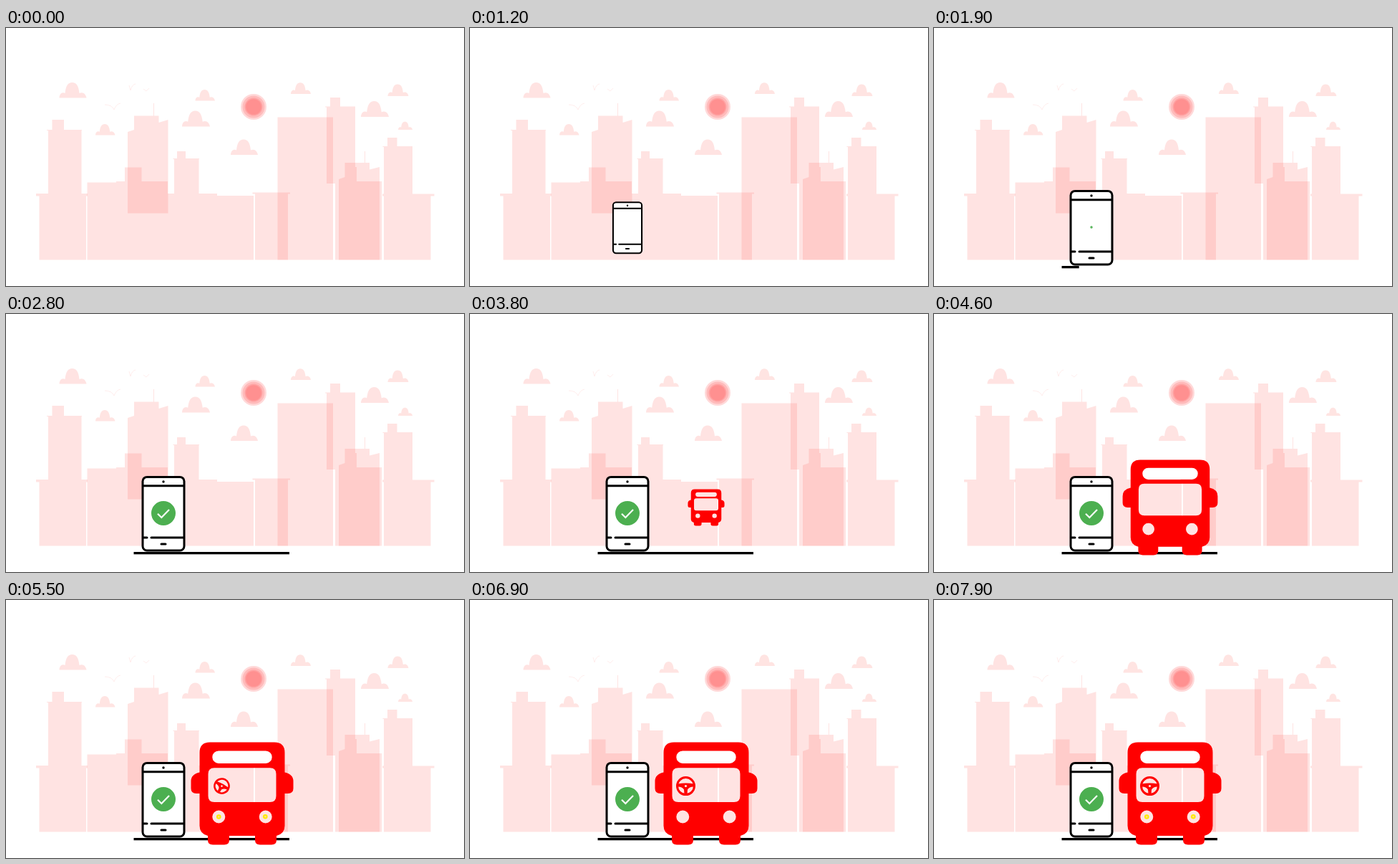
An HTML page that plays this animation: 640x360 px, repeating every 8 s.

```html
<!DOCTYPE html>
<html lang="en">
<head>
<meta charset="utf-8">
<title>Bus ticket</title>
<style>
  html, body { margin: 0; width: 100%; height: 100%; overflow: hidden; background: #fff; }
  svg { display: block; width: 100vw; height: 100vh; }
  .tint { fill: rgb(255, 80, 72); fill-opacity: .155; }
  .faint { fill: none; stroke: #ffe9e8; stroke-width: .8; }
  .ink { fill: none; stroke: #000; stroke-width: 3; stroke-linecap: round; }
</style>
</head>
<body>
<svg viewBox="0 0 640 360">
  <defs>
    <path id="cloud" d="M0 21.5C0 16 4 12.5 8 15C9 5 12 0 18 0S27 5 28 15C33 12.5 37 16 38 21.5Z"/>
  </defs>

  <g class="tint">
    <path d="M59 232V143H57V142H64.500V128H81V142H106V143H105.500V231H114V234.500H112V323.500H46.500V234.500H42V231H59Z"/>
    <path d="M113.500 323.500V215.500H154V214H166V194.500H189.500V214H226V323.500Z"/>
    <path d="M170 258.500V145L179 142V122.500H206V105H207V122.500H213.500V132L226.500 128V258.500Z"/>
    <path d="M226 323.500V231H235V183H233.500V182H239V172H251V182H270V183H269.500V231H295V234H346V323.500Z"/>
    <path d="M348 323.500V231.500H344.500V229.500H397V231.500H394V323.500Z"/>
    <path d="M379.500 124.500H457V323.500H379.500Z"/>
    <path d="M448 217V110.500H446V109.500H453V97H467V109.500H488V217Z"/>
    <path d="M460 323.500V217H488V194H490V214H525V323.500Z"/>
    <path d="M465 323.500V211L473.500 208V188H501V172H502V188H508V197.500L522 194V323.500Z"/>
    <path d="M528 323.500V234.500H526V231.500H528V166H526.500V165H533V153H546.500V165H568V231.500H598.500V234.500H593.500V323.500Z"/>
    <g id="clouds"></g>
  </g>
  <path class="faint" d="M172 80L174 87Q176 79 181 78M192 85L196 88L200 84M138 107Q148 107 151 114Q154 106 160 105"/>
  <g fill="#f44" fill-opacity=".2" transform="translate(346 110)">
    <circle r="18"/><circle r="15.500"/><circle r="12.500"/><circle r="10.800"/>
  </g>

  <rect id="ground" x="178.500" y="332" width="217.500" height="3.300"/>

  <g id="phone">
    <rect x="-29" y="-51.300" width="58" height="102.600" rx="6" fill="#fff" stroke="#000" stroke-width="3"/>
    <path class="ink" d="M-28-39H28M-28 33.300H-23M-17 33.300H28M-3 42.300H3"/>
    <circle cy="-44.700" r="1.700"/>
  </g>
  <g id="check">
    <circle r="17" fill="#4caf50"/>
    <path d="M-8 .8L-2.700 6L8-5" fill="none" stroke="#fff" stroke-width="2.200"/>
  </g>

  <g id="bus">
    <path fill="red" fill-rule="evenodd" d="M-45-71.500H45Q59.500-71.500 59.500-57V-29.500Q71.500-27 71.500-17V-7Q71.500 0 64 0H59.500V45Q59.500 56 48 59V65Q48 71.500 41 71.500H25Q18 71.500 18 65V59H-18V65Q-18 71.500-25 71.500H-41Q-48 71.500-48 65V59Q-59.500 56-59.500 45V0H-64Q-71.500 0-71.500-7V-17Q-71.500-27-59.500-29.500V-57Q-59.500-71.500-45-71.500Z
      M-33-59.500a8.700 8.700 0 0 0 0 17.400H33a8.700 8.700 0 0 0 0-17.400Z
      M-39-35.800q-8.500 0-8.500 8.500V3.500q0 8.500 8.500 8.500H39q8.500 0 8.500-8.500V-27.300q0-8.500-8.500-8.500Z
      M-41.700 32.500a9 9 0 0 0 18 0a9 9 0 0 0-18 0Z
      M23.700 32.500a9 9 0 0 0 18 0a9 9 0 0 0-18 0Z"/>
  </g>
  <g id="wheel" fill="red">
    <circle r="12" fill="none" stroke="red" stroke-width="3"/>
    <path d="M-11-3Q0-5 11-3V1Q5 1 2.500 5L2 11H-2L-2.500 5Q-5 1-11 1Z"/>
    <circle r="1.600" fill="#ffe4e2"/>
  </g>
  <g id="lampLeft"><circle r="3.300" fill="#ffeb00"/><circle r="1.200" fill="#ffd9a0"/></g>
  <g id="lampRight"><circle r="3.300" fill="#ffeb00"/><circle r="1.200" fill="#ffd9a0"/></g>
</svg>
<script>
  const LOOP = 8000, STEP = 100, LAMP_PERIOD = 2400;
  const el = id => document.getElementById(id);
  const progress = (t, start, end) => Math.min(1, Math.max(0, (t - start) / (end - start)));

  // left edge, base line, width
  const clouds = [
    [74.5, 97.5, 38], [125, 149.5, 27.5], [246, 137.5, 39], [264.5, 101.5, 27.5], [314, 177, 38],
    [398, 92, 28], [496, 124, 39], [533.5, 95, 29], [548, 142, 20]
  ];
  el('clouds').innerHTML = clouds.map(([x, base, w]) =>
    `<use href="#cloud" transform="translate(${x} ${base}) scale(${w / 38}) translate(0 -21.5)"/>`).join('');

  function place(id, x, y, scale, angle = 0) {
    const node = el(id);
    node.setAttribute('visibility', scale > 0 ? 'visible' : 'hidden');
    node.setAttribute('transform', `translate(${x} ${y}) rotate(${angle}) scale(${scale})`);
  }

  function draw(t) {
    place('phone', 220, 278.7, progress(t, 300, 1600));
    el('ground').setAttribute('width', 217.5 * progress(t, 1800, 2700));
    place('check', 220, 278, progress(t, 1800, 2800));
    place('bus', 330, 270, progress(t, 3300, 4700));

    const sway = 30 * Math.sin((t - 6900) / 1000 * Math.PI);
    place('wheel', 301.5, 259.6, progress(t, 4600, 5670), sway);

    const lampAge = t < 4600 ? 0 : (t - 4600) % LAMP_PERIOD;
    const glow = lampAge < 1700 ? lampAge / 900 : 0;
    place('lampLeft', 297.3, 302.5, glow);
    place('lampRight', 362.3, 302.3, glow);
  }

  function tick(now) {
    draw(Math.floor(now % LOOP / STEP) * STEP);
    requestAnimationFrame(tick);
  }
  requestAnimationFrame(tick);
</script>
</body>
</html>
```
